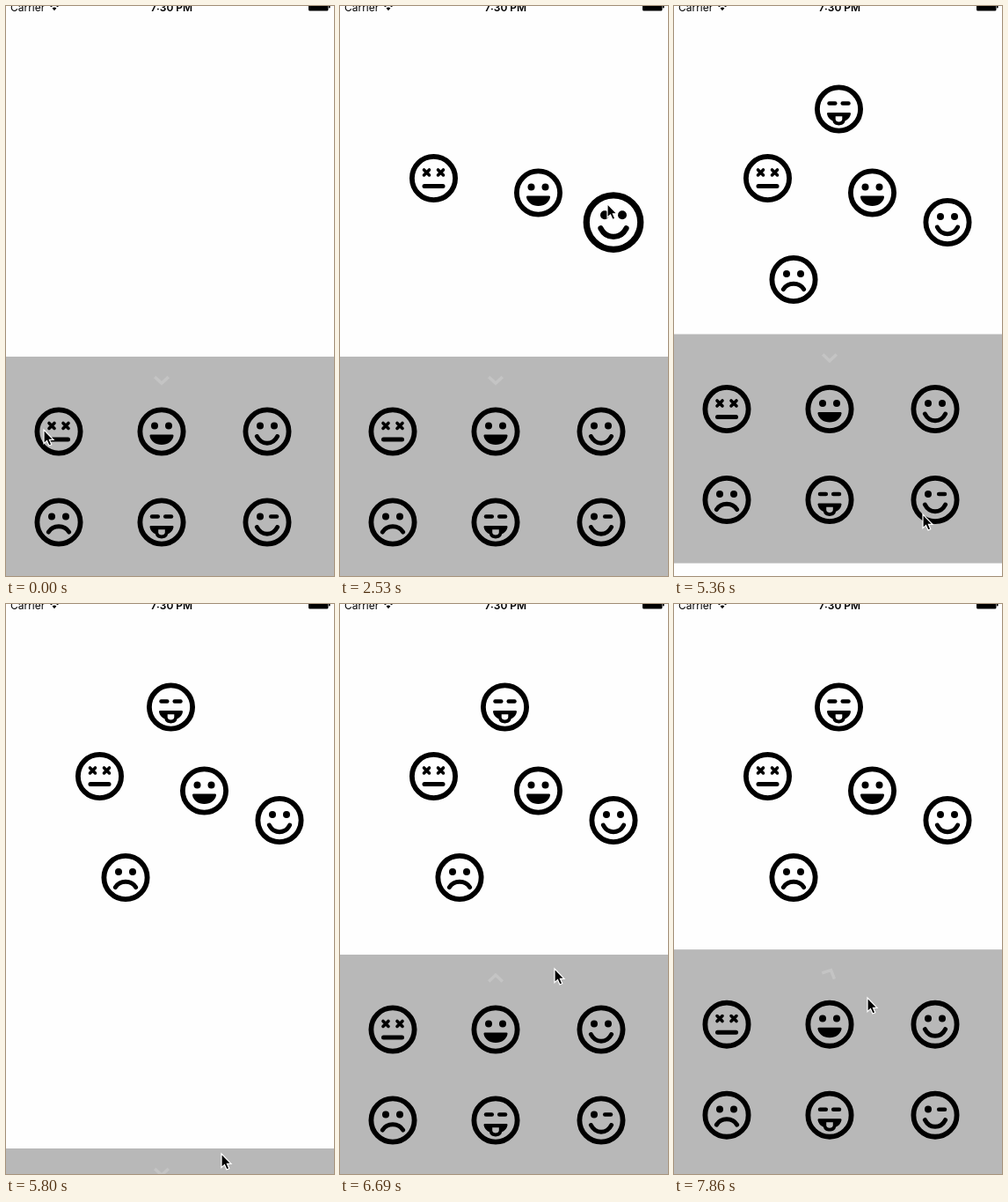
An HTML page for the animation above (8 s loop, 373 by 647 pixels).

```html
<!DOCTYPE html>
<html lang="en">
<head>
<meta charset="utf-8">
<title>Emoji tray</title>
<style>
html, body { margin: 0; width: 100%; height: 100%; overflow: hidden; background: #fefefe; }
svg { display: block; width: 100%; height: 100%; }
text { font: 12px Inter, Arial, sans-serif; }
.line { fill: none; stroke: #000; stroke-width: 5; stroke-linecap: round; stroke-linejoin: round; }
</style>
</head>
<body>
<svg viewBox="0 0 373 647">
  <defs>
    <circle id="ring" r="24.6" class="line" style="stroke-width:5.8"/>
    <circle id="dot" r="4"/>
    <path id="dash" class="line" style="stroke-width:4.5" d="M-3.4 0H3.4"/>
    <path id="cross" class="line" style="stroke-width:3.6" d="M-3-3L3 3M3-3L-3 3"/>
    <path id="curve" class="line" d="M-11.6 5.5C-6.5 15.7 6.5 15.7 11.6 5.5"/>
    <g id="dots"><use href="#dot" x="-8" y="-6.6"/><use href="#dot" x="8" y="-6.6"/></g>
    <g id="dead"><use href="#ring"/><use href="#cross" x="-8" y="-6.6"/><use href="#cross" x="8" y="-6.6"/>
      <path class="line" d="M-10.5 9H10.5"/></g>
    <g id="grin"><use href="#ring"/><use href="#dots"/>
      <path d="M-12.5 3.5H12.5Q13.7 3.5 13.5 5C12.5 11 7 15 0 15S-12.5 11-13.5 5Q-13.7 3.5-12.5 3.5Z"/></g>
    <g id="smile"><use href="#ring"/><use href="#dots"/><use href="#curve"/></g>
    <g id="frown"><use href="#ring"/><use href="#dots"/>
      <path class="line" d="M-11.6 11C-6.5 2.6 6.5 2.6 11.6 11"/></g>
    <g id="tongue"><use href="#ring"/><use href="#dash" x="-7.6" y="-6.4"/><use href="#dash" x="7.6" y="-6.4"/>
      <path fill-rule="evenodd" d="M-12.5 4H12.5Q13.7 4 13.5 5.5Q12.5 11 7 13.5C6 20-6 20-7 13.5Q-12.5 11-13.5 5.5Q-13.7 4-12.5 4ZM-3.8 8.2V11.5C-3.8 15.5 3.8 15.5 3.8 11.5V8.2Z"/></g>
    <g id="wink"><use href="#ring"/><use href="#dot" x="-8" y="-6.6"/><use href="#dash" x="7.6" y="-6.4"/>
      <use href="#curve"/></g>
  </defs>

  <text x="5" y="5.5">Carrier</text>
  <path d="M55 5.2L52.6 2.6Q55 .6 57.4 2.6Z"/>
  <path d="M50.6.6Q55-3 59.4.6" fill="none" stroke="#000" stroke-width="1.8"/>
  <text x="188.3" y="5.5" text-anchor="middle" style="font-weight:600">7:30 PM</text>
  <rect x="344" y="-5" width="22.5" height="10.5" rx="1.5"/>
  <rect x="367" y="-2" width="1.6" height="4.5" rx=".8"/>

  <g id="tray">
    <rect width="373" height="260" fill="#b8b8b8"/>
    <path id="arrow" d="M-7.8-3.8L0 3.6L7.8-3.8" fill="none" stroke="#c4c4c4" stroke-width="3.5"/>
  </g>
  <g id="placed"></g>
  <path id="cursor" d="M0-1V14.6L3.5 11.4L6 17L8.8 15.8L6.4 10.3H11Z" stroke="#fff" stroke-width="1.2"/>
</svg>
<script>
const $ = id => document.getElementById(id);
const LOOP = 8000, STEP = 148.4, OPEN = 398, SHUT = 618, OVER = 391.5;

const linear = p => p;
const smooth = p => p * p * (3 - 2 * p);
const out = p => 1 - (1 - p) ** 3;

// Tray order; the dragged ones have grab and drop step, resting place and pointer offset
const emoji = [
  { name: "dead", grab: 2.5, drop: 6, rest: [106.5, 195.5], hold: [-17, -1] },
  { name: "grin", grab: 9.5, drop: 12, rest: [225.5, 212], hold: [-9, -11] },
  { name: "smile", grab: 15, drop: 17, rest: [311, 245.5], hold: [-7, -20] },
  { name: "frown", grab: 21.5, drop: 23, rest: [136, 310.5], hold: [-7, 2] },
  { name: "tongue", grab: 28, drop: 31.5, rest: [187.5, 117], hold: [-24, -5] },
  { name: "wink" }
];
const drags = emoji.filter(e => e.rest);

// Step, tray top, arrow angle
const swings = [
  [0, OPEN, 0], [35, OPEN, 0], [36, 372.5, 0], [39, SHUT, 0], [40, SHUT, 0], [42, OVER, -180],
  [45, OPEN, -180], [48, SHUT, 0], [50, SHUT, 0], [53.5, OVER, -180]
];

function at(keys, n, ease) {
  const k = keys.findIndex(key => key[0] > n);
  if (k < 1) return keys[k < 0 ? keys.length - 1 : 0];
  const a = keys[k - 1], b = keys[k], p = (b[3] || ease)((n - a[0]) / (b[0] - a[0]));
  return a.map((v, i) => v + (b[i] - v) * p);
}

function addFace(parent, name) {
  const face = document.createElementNS("http://www.w3.org/2000/svg", "use");
  face.setAttribute("href", "#" + name);
  return parent.appendChild(face);
}

const move = (el, x, y, more = "") => el.setAttribute("transform", `translate(${x} ${y}) ${more}`);

emoji.forEach((e, i) => {
  e.home = [[60, 177, 297][i % 3], i < 3 ? 85 : 188];
  move(addFace($("tray"), e.name), ...e.home);
});

// The pointer hurries to each face, drags it away, then plays with the tray
const pointer = drags.flatMap(({ grab, drop, home: [x, y], rest, hold: [dx, dy] }) => [
  [grab, x + dx, y + OPEN + dy, out],
  [drop, rest[0] + dx, rest[1] + dy, smooth]
]).concat([
  [35, 283, 603], [36, 283, 578], [39, 245, 625], [42, 232, 313], [43, 231, 125],
  [45, 244, 415], [48, 245, 618], [49, 245, 618], [53, 220, 448]
]);

for (const d of drags) d.face = addFace($("placed"), d.name);

function draw(now) {
  const n = Math.floor((now % LOOP + 6) / STEP);
  const [, x, y] = at(pointer, n, smooth);
  move($("cursor"), x, y);
  move($("tray"), 0, at(swings, n, out)[1]);
  move($("arrow"), 177, 26.7, `rotate(${at(swings, n, linear)[2]})`);
  for (const { face, grab, drop, rest, hold } of drags) {
    face.style.display = n < grab ? "none" : "";
    if (n <= drop) move(face, x - hold[0], y - hold[1], "scale(1.25)");
    else move(face, ...rest);
  }
}

const began = performance.now();
function tick() {
  draw(performance.now() - began);
  requestAnimationFrame(tick);
}
tick();
</script>
</body>
</html>
```
